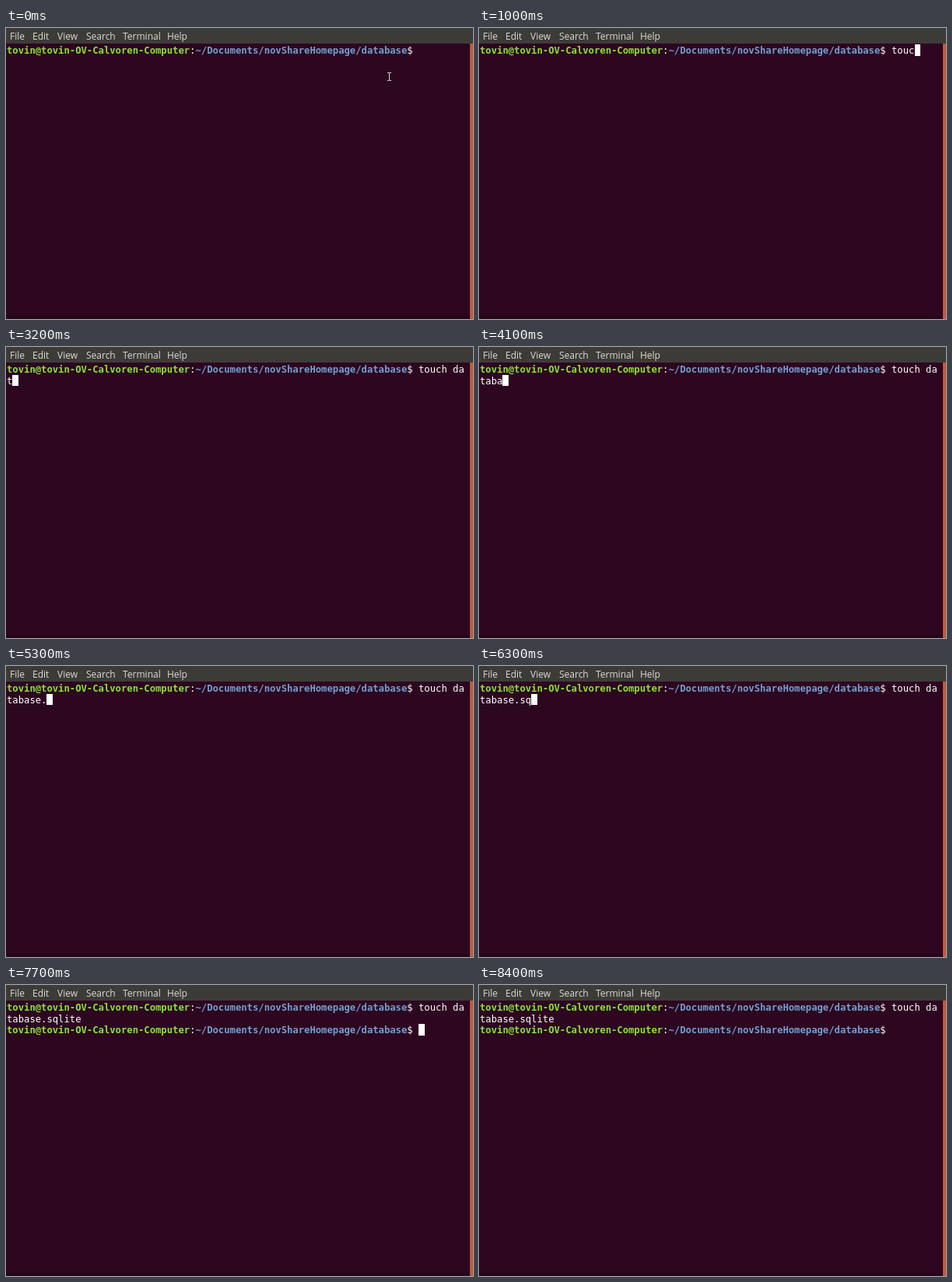
An HTML page for the animation above (8500 ms loop, 600 px wide and 374 px high).

```html
<!DOCTYPE html>
<html lang="en">
<head>
<meta charset="utf-8">
<title>Terminal</title>
<style>
  html, body { margin: 0; width: 100%; height: 100%; overflow: hidden; background: #2d0720; }
  #stage { position: relative; width: 600px; height: 374px; overflow: hidden; }
  #stage > * { position: absolute; }
  #menu { left: 0; top: 0; width: 600px; height: 20px; background: #3d3b37;
          font: 12px/22px "Open Sans", sans-serif; color: #dfdbd2; }
  #menu span { position: absolute; top: 0; white-space: pre; }
  #scrollbar { left: 596px; top: 20px; width: 4px; height: 354px; background: #c05a3c; }
  #bottom { left: 0; top: 370px; width: 596px; height: 4px; background: #240519; }
  .row { left: 1px; margin: 0; white-space: pre; color: #fff;
         font: 12.21px/14.65px "DejaVu Sans Mono", monospace; }
  .row b:first-child { color: #8ae234; }
  .row b:last-child { color: #729fcf; }
  #cursor { width: 7.35px; height: 14.65px; background: #fff; }
  #pointer { left: 488px; top: 56px; }
</style>
</head>
<body>
<div id="stage">
  <div id="menu"></div>
  <div id="bottom"></div>
  <div id="scrollbar"></div>
  <div id="cursor"></div>
  <svg id="pointer" width="9" height="13" fill="none" stroke="#ddd" stroke-width="1">
    <path d="M2 1.5H4L4.5 2L5 1.5H7M4.5 2V11M2 11.5H4L4.5 11L5 11.5H7"/>
  </svg>
</div>
<script>
const LOOP = 8500, BLINK = 600, COLUMNS = 80;
const CELL_W = 7.351, CELL_H = 14.65, LEFT = 1, CURSOR_TOP = 21, TEXT_TOP = 22;
const USER = 'tovin@tovin-OV-Calvoren-Computer';
const FOLDER = '~/Documents/novShareHomepage/database';
const PROMPT = `<b>${USER}</b>:<b>${FOLDER}</b>$ `;
const PROMPT_LENGTH = USER.length + FOLDER.length + 3;
const COMMAND = 'touch database.sqlite';
// One time per typed character, then the Enter key.
const KEYS = [200, 400, 700, 1000, 1300, 1600, 1900, 2800, 3200, 3600, 3700,
              4000, 4400, 5000, 5200, 5800, 6200, 6500, 6800, 7100, 7400, 7700];

const stage = document.getElementById('stage');
const cursor = document.getElementById('cursor');
const pointer = document.getElementById('pointer');

const MENU = { File: 5, Edit: 34, View: 66, Search: 103, Terminal: 150, Help: 207 };
for (const [label, x] of Object.entries(MENU)) {
  const item = document.createElement('span');
  item.textContent = label;
  item.style.left = x + 'px';
  document.getElementById('menu').append(item);
}

const rows = [0, 1, 2].map(i => {
  const row = document.createElement('pre');
  row.className = 'row';
  row.style.top = TEXT_TOP + i * CELL_H + 'px';
  stage.append(row);
  return row;
});

let shownCount = -1;

function showText(count) {
  if (count === shownCount) return;
  shownCount = count;
  const typed = COMMAND.slice(0, count);
  const room = COLUMNS - PROMPT_LENGTH;
  const entered = count > COMMAND.length;
  rows[0].innerHTML = PROMPT + typed.slice(0, room);
  rows[1].textContent = typed.slice(room);
  rows[2].innerHTML = entered ? PROMPT : '';

  const position = entered ? 2 * COLUMNS + PROMPT_LENGTH : PROMPT_LENGTH + count;
  cursor.style.left = LEFT + position % COLUMNS * CELL_W + 'px';
  cursor.style.top = CURSOR_TOP + Math.floor(position / COLUMNS) * CELL_H + 'px';
}

function draw(now) {
  const t = now % LOOP;
  const count = KEYS.filter(time => time <= t).length;
  showText(count);
  const lit = count > 0 && t - KEYS[count - 1] < BLINK;
  cursor.style.visibility = lit ? 'visible' : 'hidden';
  pointer.style.visibility = count ? 'hidden' : 'visible';
}

const start = performance.now();
function tick() {
  draw(performance.now() - start);
  requestAnimationFrame(tick);
}
tick();
</script>
</body>
</html>
```
